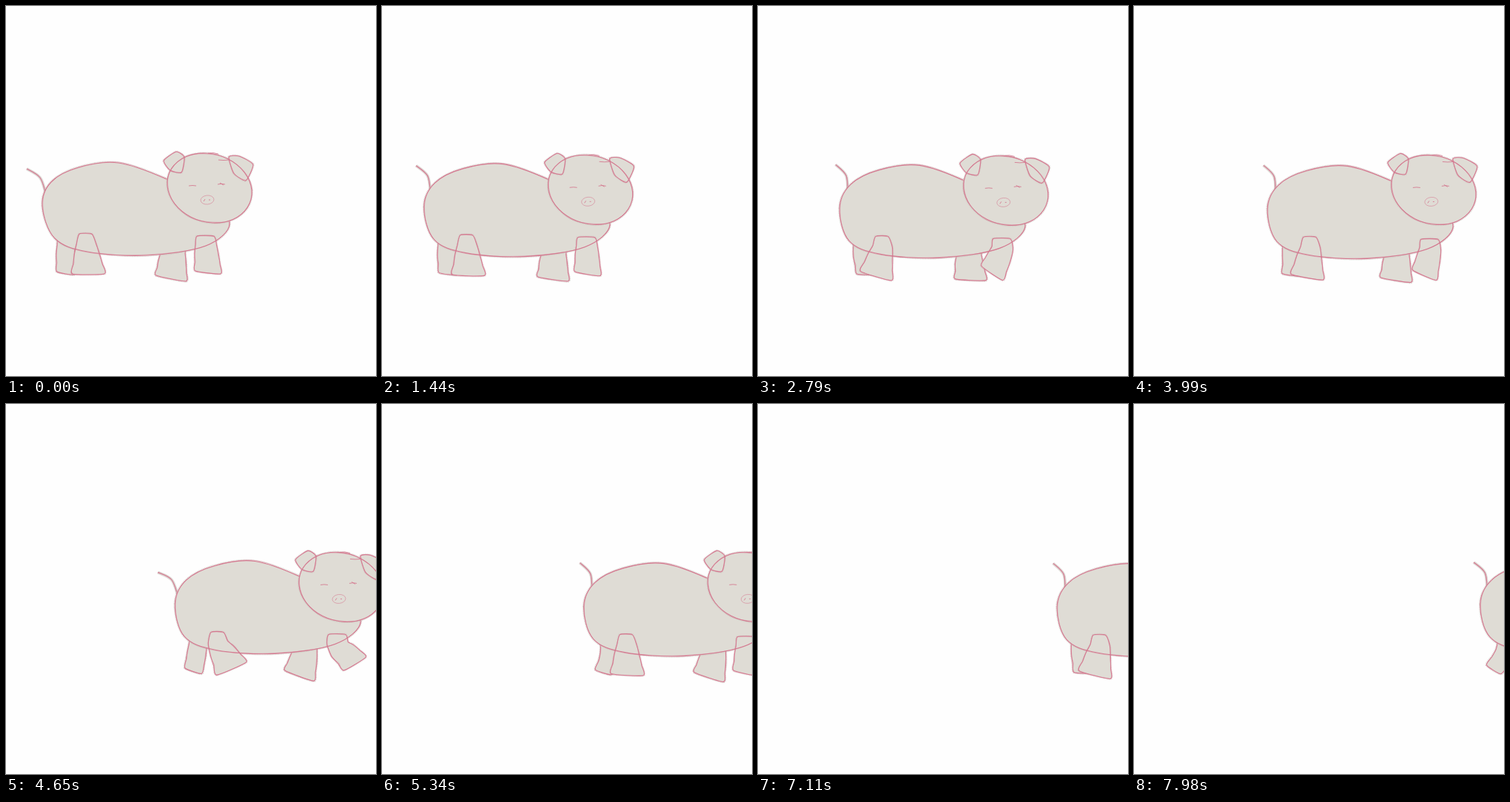
Write an HTML page with a canvas that moves like this. It is 500x500 px and loops after 8000 ms.

```html
<!DOCTYPE html>
<html lang="en">
<head>
<meta charset="utf-8">
<title>Walking pig</title>
<style>
  html, body { margin: 0; width: 100%; height: 100%; overflow: hidden; background: #fefefe; }
  canvas { display: block; width: 100vw; height: 100vh; object-fit: contain; }
</style>
</head>
<body>
<canvas id="stage" width="500" height="500"></canvas>
<script>
const ctx = document.getElementById('stage').getContext('2d');
const LOOP = 8000, STEP = 30, STRIDE = 1500;
const FILL = '#dfdcd5', PENCIL = '#d4768e', FRINGE = '#c9c1bb';
const SOFT = 0.1, ROUND = 1 / 6;

const BODY = [[49,270],[61,238],[98,218],[152,212],[218,234],[270,262],[302,294],[270,324],
  [190,337],[110,332],[66,314]];
const HEAD = Array.from({ length: 12 }, (_, i) => {
  const a = i * Math.PI / 6;
  return [275 + 57 * Math.cos(a) + 4 * Math.sin(a), 246 + 47 * Math.sin(a) + 3 * Math.cos(a)];
});
const EAR_L = [[213,209],[230,197],[241,204],[237,225],[222,222]];
const EAR_R = [[301,204],[315,203],[334,214],[324,236],[308,226]];
const TAIL = [[28,220],[46,232],[54,254]];

const clamp = v => Math.max(0, Math.min(1, v));
const ease = v => v * v * (3 - 2 * v);
const mix = (a, b, u) => a + (b - a) * u;

// Periodic curves over one stride, highest at the given moment
const wave = (t, peak) => Math.cos((t - peak) / STRIDE * 2 * Math.PI);
const pulse = (t, peak, sharpness) => ((1 + wave(t, peak)) / 2) ** sharpness;

// Slow push back, quick return forward: 0 is fully forward, 1 fully back
function stepCurve(t, forward, share) {
  const u = ((t - forward) / STRIDE % 1 + 1) % 1;
  const v = u < share ? u / share : (1 - u) / (1 - share);
  return (1 - Math.cos(Math.PI * v)) / 2;
}

// Distance walked: the speed climbs smoothly to its limit
function travel(t) {
  const s = Math.max(0, t / 1000 - 1), lag = 1.41;
  return 75 * (s - lag * (1 - Math.exp(-s / lag)));
}

function makeLeg(top, bottom, hipLeft, hipRight, footLeft, footRight, tilt = 0) {
  const left = [], right = [];
  for (let i = 0; i <= 4; i++) {
    const u = i / 4, y = mix(top, bottom, u), bulge = 2 * Math.sin(Math.PI * u);
    left.push([mix(hipLeft, footLeft, u) - bulge, y - tilt * u]);
    right.unshift([mix(hipRight, footRight, u) + bulge, y + tilt * u]);
  }
  return { points: [...left, ...right], hip: (hipLeft + hipRight) / 2, top };
}

const rearFar = makeLeg(312, 361, 71, 91, 69, 92, 2);
const rearNear = makeLeg(308, 362, 99, 116, 90, 133);
const frontFar = makeLeg(324, 368, 213, 240, 203, 243, 4);
const frontNear = makeLeg(311, 360, 258, 281, 256, 290, 2);

function turn([x, y], cx, cy, degrees) {
  const a = degrees * Math.PI / 180, c = Math.cos(a), s = Math.sin(a);
  return [cx + (x - cx) * c - (y - cy) * s, cy + (x - cx) * s + (y - cy) * c];
}

// The hip stays put while the foot swings below it
function bend(leg, degrees, knee = 0) {
  return leg.points.map(p => {
    const depth = p[1] - leg.top;
    const [x, y] = turn(p, leg.hip, leg.top + 14, degrees * ease(clamp((depth - 4) / 26)));
    return [x + knee * Math.sin(Math.PI * clamp(depth / 50)), y];
  });
}

function trace(points, tension, closed = true) {
  const n = points.length;
  const at = i => closed ? points[(i + n) % n] : points[Math.max(0, Math.min(n - 1, i))];
  ctx.beginPath();
  ctx.moveTo(...points[0]);
  for (let i = 0; i < (closed ? n : n - 1); i++) {
    const [p, a, b, q] = [at(i - 1), at(i), at(i + 1), at(i + 2)];
    ctx.bezierCurveTo(a[0] + (b[0] - p[0]) * tension, a[1] + (b[1] - p[1]) * tension,
      b[0] - (q[0] - a[0]) * tension, b[1] - (q[1] - a[1]) * tension, b[0], b[1]);
  }
  if (closed) ctx.closePath();
}

function stroke(color, width, alpha = 1) {
  ctx.strokeStyle = color;
  ctx.lineWidth = width;
  ctx.globalAlpha = alpha;
  ctx.stroke();
  ctx.globalAlpha = 1;
}

function paper(points, tension, fringe = 0.6) {
  trace(points, tension);
  ctx.setLineDash([1.5, 0.7]);
  stroke(FRINGE, 3.6, fringe);
  ctx.setLineDash([]);
  ctx.fillStyle = FILL;
  ctx.fill();
}

// A pencil line gone over twice
function pencil(points, tension, closed = true) {
  trace(points, tension, closed);
  stroke(PENCIL, 1.1, 0.95);
  const loose = points.map(([x, y], i) => [x + 0.9 * Math.sin(i * 2.3 + 1), y + 0.9 * Math.sin(i * 3.7)]);
  trace(loose, tension, closed);
  stroke(PENCIL, 0.8, 0.55);
}

function line(x0, y0, x1, y1, bow = 0) {
  ctx.beginPath();
  ctx.moveTo(x0, y0);
  ctx.quadraticCurveTo((x0 + x1) / 2, (y0 + y1) / 2 + bow, x1, y1);
  stroke(PENCIL, 1, 0.85);
}

function drawFace() {
  line(247, 243, 257, 243, -1);
  line(286, 241, 296, 241, -1.5);
  line(289, 239, 294, 242);
  ctx.beginPath();
  ctx.ellipse(272, 262, 9, 6, -0.1, 0, Math.PI * 2);
  stroke(PENCIL, 0.9, 0.6);
  line(267, 264, 269, 261);
  line(274, 262, 276, 262);
  line(273, 199, 287, 200, -2);
  line(287, 208, 301, 208, 1);
}

function draw(time) {
  const gait = ease(clamp((time - 800) / 900));
  const near = gait * mix(-29, 21, stepCurve(time, 160, 0.75));
  const far = gait * (6 + 15 * wave(time, 480));
  const knee = gait * 8 * pulse(time, 650, 2);
  const bob = gait * (2.2 + 2.2 * wave(time, 1050));
  const nod = gait * (1.6 + 1.8 * wave(time, 1250));
  const wag = gait * (10 - 19 * pulse(time, 220, 6));
  const shift = travel(time) + gait * 2.5 * wave(time, 0);
  const lean = ([x, y]) => [x + gait * 0.09 * (285 - y), y];

  const body = BODY.map(lean);
  const tail = TAIL.map(p => lean(turn(p, 85, 275, wag)));
  const farLegs = [bend(rearFar, far, knee), bend(frontFar, far)];
  const nearLegs = [bend(rearNear, near * 0.8), bend(frontNear, near * 1.3)];

  ctx.setTransform(1, 0, 0, 1, 0, 0);
  ctx.fillStyle = '#fefefe';
  ctx.fillRect(0, 0, 500, 500);
  ctx.lineJoin = 'round';

  ctx.translate(shift, bob);
  trace(tail, ROUND, false);
  stroke(FRINGE, 4, 0.6);
  pencil(tail, ROUND, false);

  ctx.translate(0, -bob / 2);
  for (const leg of farLegs) { paper(leg, SOFT); pencil(leg, SOFT); }

  ctx.translate(0, bob / 2);
  paper(body, ROUND);
  for (const leg of nearLegs) paper(leg, SOFT, 0.35);
  pencil(body, ROUND);
  for (const leg of nearLegs) pencil(leg, SOFT);

  ctx.translate(0, nod - bob);
  paper(HEAD, ROUND);
  for (const ear of [EAR_L, EAR_R]) paper(ear, SOFT, 0.4);
  pencil(HEAD, ROUND);
  for (const ear of [EAR_L, EAR_R]) pencil(ear, SOFT);
  drawFace();
}

const start = performance.now();
function frame() {
  const time = (performance.now() - start) % LOOP;
  draw(Math.floor(time / STEP) * STEP);
  requestAnimationFrame(frame);
}
frame();
</script>
</body>
</html>
```
